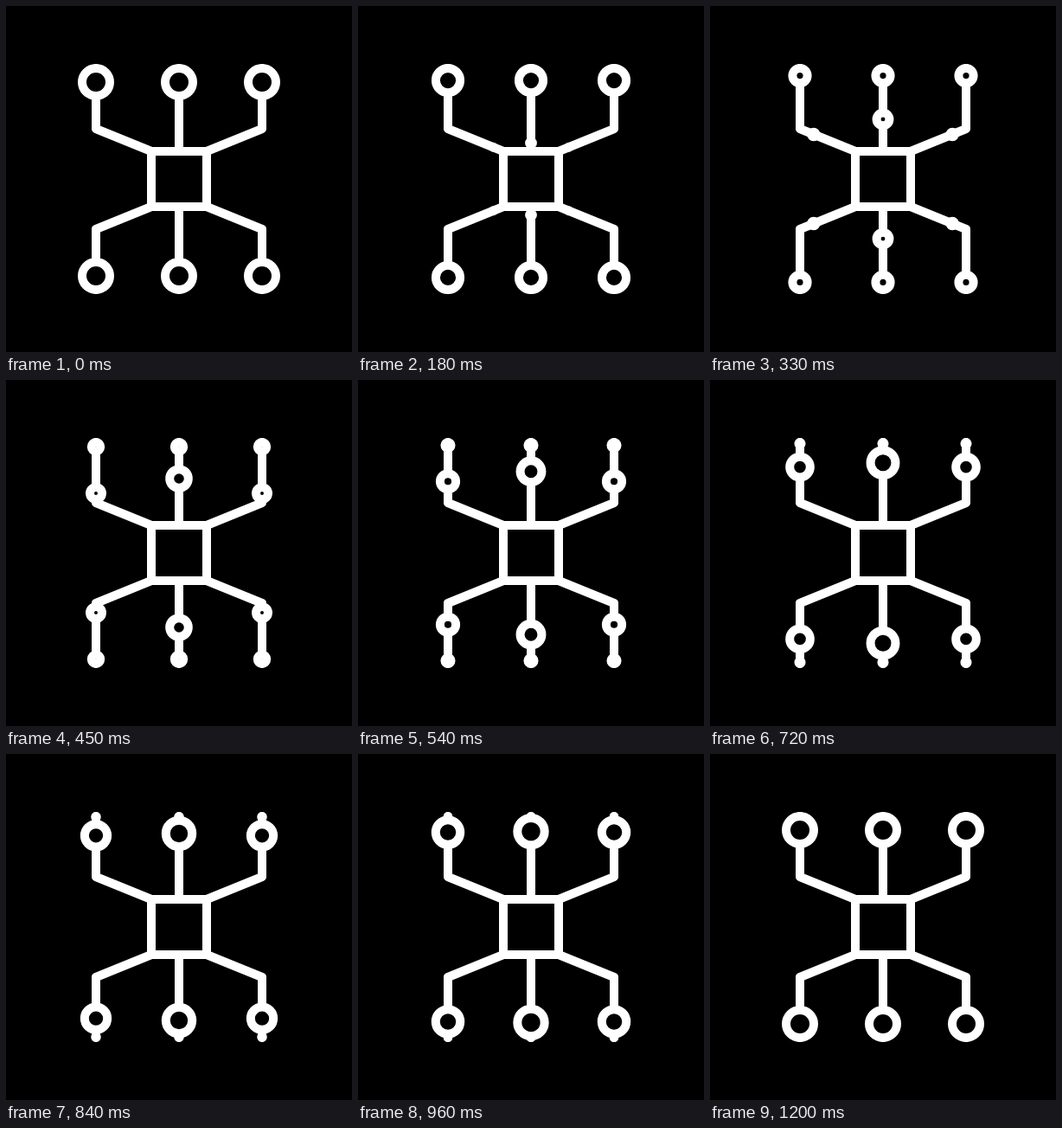
Write an HTML page with a canvas that moves like this. It is 400 by 400 pixels and loops after 1.43 s.

```html
<!DOCTYPE html>
<html lang="en">
<head>
<meta charset="utf-8">
<title>Chip nodes</title>
<style>
  html, body { margin: 0; height: 100%; overflow: hidden; background: #000; }
  canvas { display: block; }
</style>
</head>
<body>
<canvas width="400" height="400"></canvas>
<script>
const ctx = document.querySelector('canvas').getContext('2d');
const LOOP = 1430, MOVE = 1200;
const RADIUS = 16, TIP = -128, END = TIP + RADIUS;
const CORNER = 32, BEND = { x: 96, y: -58 };

// Cubic Bézier easing, solved by bisection
function bezier(x1, y1, x2, y2) {
  const curve = (s, a, b) => 3 * (1 - s) ** 2 * s * a + 3 * (1 - s) * s * s * b + s ** 3;
  return x => {
    if (x >= 1) return 1;
    let lo = 0, hi = 1;
    for (let i = 0; i < 24; i++) {
      const mid = (lo + hi) / 2;
      if (curve(mid, x1, x2) < x) lo = mid; else hi = mid;
    }
    return curve(lo, y1, y2);
  };
}
const rise = bezier(.32, 0, .12, 1);
const travel = bezier(.34, 0, .14, 1);
const grow = bezier(.5, 0, .05, .54);

function line(...points) {
  ctx.beginPath();
  points.forEach(([x, y]) => ctx.lineTo(x, y));
  ctx.stroke();
}

function ring(x, y, r) {
  ctx.beginPath();
  ctx.arc(x, y, r, 0, 2 * Math.PI);
  ctx.fill();
  ctx.stroke();
}

// Point at a fraction of the bent wire between chip corner and ring
function onWire(p) {
  const dx = BEND.x - CORNER, dy = BEND.y + CORNER;
  const slant = Math.hypot(dx, dy);
  const d = p * (slant + BEND.y - END);
  return d < slant
    ? [CORNER + dx * d / slant, -CORNER + dy * d / slant]
    : [BEND.x, BEND.y - (d - slant)];
}

function draw(u) {
  const p = rise(u), shrunk = RADIUS * (1 - p);
  ctx.setTransform(1, 0, 0, 1, 0, 0);
  ctx.fillStyle = '#000';
  ctx.fillRect(0, 0, 400, 400);
  ctx.strokeStyle = '#fff';
  ctx.lineWidth = 10;
  ctx.lineCap = ctx.lineJoin = 'round';

  for (const sy of [1, -1]) {
    for (const sx of [1, -1]) {
      ctx.setTransform(sx, 0, 0, sy, 200, 200);
      line([CORNER, -CORNER], [BEND.x, BEND.y], [BEND.x, TIP]);
      ring(BEND.x, TIP + shrunk, shrunk);
      ring(...onWire(travel(u)), RADIUS * grow(u));
    }
    line([0, -CORNER], [0, TIP]);
    ring(0, TIP + shrunk, shrunk);
    ring(0, -CORNER + (END + CORNER) * p, RADIUS * p);
  }
  ctx.strokeRect(-CORNER, -CORNER, 2 * CORNER, 2 * CORNER);
}

function tick() {
  draw(Math.min(performance.now() % LOOP / MOVE, 1));
  requestAnimationFrame(tick);
}
tick();
</script>
</body>
</html>
```
